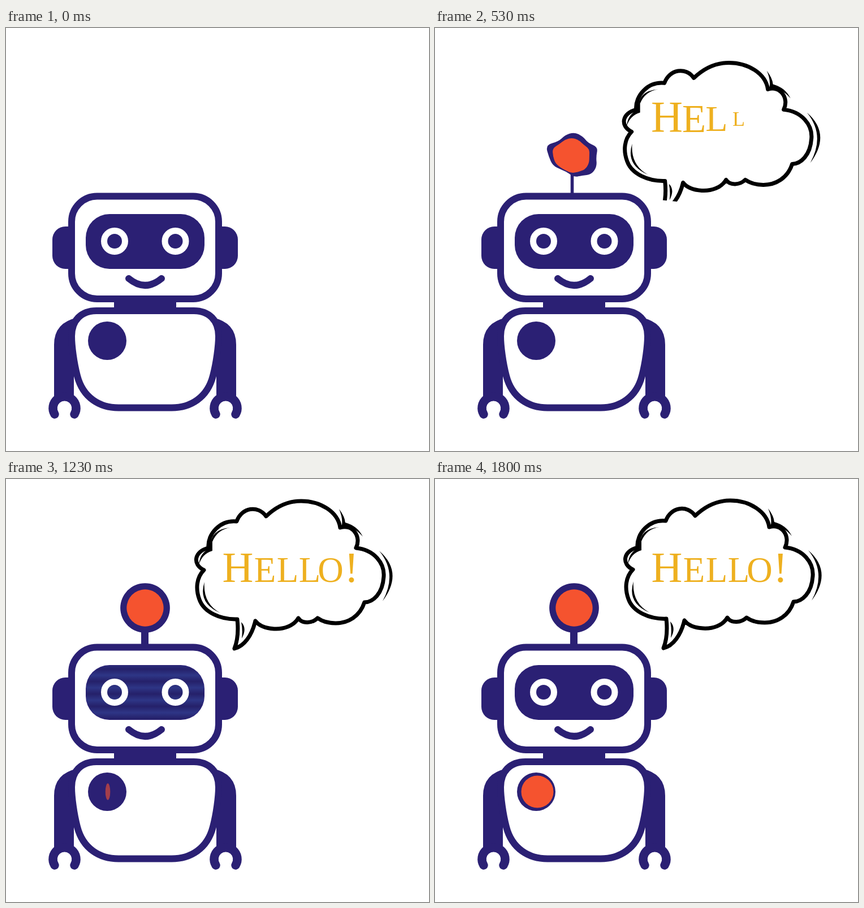
Write an HTML page that moves like this. It is 748 px wide and 748 px high and loops after 5000 ms.

```html
<!DOCTYPE html>
<html lang="en">
<head>
<meta charset="utf-8">
<title>Robot says hello</title>
<style>
  html, body { margin: 0; height: 100%; overflow: hidden; background: #fff; }
  svg { display: block; width: 100vw; height: 100vh; }
  text { font-family: "Liberation Serif", "Times New Roman", serif; text-anchor: middle; fill: #eeb01f; }
  .ink { fill: #2b2074; }
  .line { stroke: #2b2074; stroke-width: 12; fill: #fff; }
  .badge { fill: #f5532f; }
</style>
</head>
<body>
<svg viewBox="0 0 748 748">
  <defs>
    <clipPath id="wipe"><path d="M0 0H748V339L0 264Z"/></clipPath>
    <linearGradient id="bands" gradientUnits="userSpaceOnUse" x1="0" y1="358" x2="0" y2="369" spreadMethod="reflect">
      <stop offset="0" stop-color="#252069"/><stop offset="1" stop-color="#2e3686"/>
    </linearGradient>
    <g id="side">
      <rect class="ink" x="82" y="351" width="60" height="75" rx="23"/>
      <path class="ink" d="M128 512Q85 520 85 560V655H120V610H130Z"/>
      <path d="M86 683A20.5 20.5 0 1 1 121 683" fill="none" stroke="#2b2074" stroke-width="15.5" stroke-linecap="round"/>
    </g>
  </defs>

  <g id="antenna">
    <rect id="stem" class="ink" y="255" height="40"/>
    <path id="rim" class="ink"/>
    <path id="bulb" class="badge"/>
  </g>

  <use href="#side"/>
  <use href="#side" transform="matrix(-1 0 0 1 492 0)"/>
  <path class="line" d="M160 500H332C358 500 376 516 376 545C376 562 372 592 366 615C356 654 326 671.500 293 671.500H199C166 671.500 136 654 126 615C120 592 116 562 116 545C116 516 134 500 160 500Z"/>
  <rect class="line" x="116" y="297.500" width="260" height="181.500" rx="45"/>
  <rect class="ink" x="191" y="475" width="110" height="30"/>
  <rect class="ink" x="141" y="329" width="210" height="97" rx="42"/>
  <g id="screen">
    <rect x="142" y="330" width="208" height="95" rx="41" fill="#312b96"/>
    <rect id="stripes" x="142" y="330" width="208" height="95" rx="41" fill="url(#bands)"/>
  </g>
  <g fill="none" stroke="#fff" stroke-width="11">
    <circle cx="192" cy="377" r="18.500"/>
    <circle cx="299.500" cy="377" r="18.500"/>
  </g>
  <path d="M217 443Q246 467 275 443" fill="none" stroke="#2b2074" stroke-width="12" stroke-linecap="round"/>
  <circle class="ink" cx="179" cy="553" r="34"/>
  <circle id="chest" class="badge" r="28.500"/>

  <g clip-path="url(#wipe)">
    <g id="bubble">
      <path fill="none" stroke="#000" stroke-width="7" stroke-linejoin="round" d="M404 299C410 284 411 265 409 247
        C380 248 350 235 342 212C335 193 337 173 350 160
        C329 150 333 127 358 121C356 96 379 71 408 74
        C417 49 446 45 460 65C480 46 502 38 522 38
        C556 38 587 57 591 85C613 78 629 101 619 121
        C651 124 670 148 668 172C666 202 649 217 634 217
        C626 242 605 254 583 254C568 254 558 250 551 245
        C542 254 524 256 517 245C509 259 491 265 474 264
        C457 263 447 258 441 250C435 276 421 295 404 299Z"/>
      <path d="M351 181Q339 219 379 236Q348 219 351 181Z
        M397 85Q374 88 365 110V126Q347 131 341 151Q343 129 360 122Q361 87 397 85Z
        M589 52Q599 65 600 76Q622 82 631 101Q616 83 594 81Q596 68 589 52Z
        M660 126Q704 164 666 215Q693 166 660 126Z
        M416 252Q427 263 417 281Q419 266 416 252Z"/>
    </g>
  </g>
  <g id="word"></g>
</svg>
<script>
const LOOP = 5000;
const byId = id => document.getElementById(id);
const clamp = x => Math.max(0, Math.min(1, x));
const progress = (t, start, length) => clamp((t - start) / length);
const backOut = p => 1 + 2.7 * (p - 1) ** 3 + 1.7 * (p - 1) ** 2;
const set = (id, attributes) => {
  for (const name in attributes) byId(id).setAttribute(name, attributes[name]);
};

const letterCentres = [410, 458, 498, 537, 574, 611];
const letters = [..."HELLO!"].map((character, i) => {
  const letter = document.createElementNS("http://www.w3.org/2000/svg", "text");
  letter.textContent = character;
  letter.setAttribute("font-size", i % 5 ? 63 : 76);
  letter.setAttribute("y", 22);
  byId("word").append(letter);
  return letter;
});

// Radii around the antenna lamp while it is most distorted, clockwise from the right.
const lumps = [37, 42, 42, 34, 34, 28, 30, 39, 43, 53, 37, 40, 42, 38, 33, 44];

function blob(cx, cy, radius, wobble) {
  const points = lumps.map((lump, i) => {
    const angle = i * Math.PI / 8;
    // Rounds off to a circle: control points sit slightly outside the curve.
    const r = radius * 1.04 + (lump - 43) * wobble;
    return [cx + r * Math.cos(angle), cy + r * Math.sin(angle)];
  });
  const middle = ([a, b], [c, d]) => `${(a + c) / 2} ${(b + d) / 2}`;
  const curves = points.map((p, i) => `Q${p} ${middle(p, points[(i + 1) % 16])}`);
  return `M${middle(points[15], points[0])}${curves.join("")}Z`;
}

function draw(t) {
  const drop = 275 * 2 ** (-t / 150);
  set("bubble", { transform: `translate(${-0.1 * drop} ${drop})`, opacity: t < 20 ? 0 : 1 });

  letters.forEach((letter, i) => {
    const p = progress(t, 272 + 72 * i, 300);
    letter.setAttribute("transform", `translate(${letterCentres[i]} 160) scale(${p ? backOut(p) : 0})`);
  });

  const wobble = clamp((870 - t) / 340 / 1.4) * 1.4;
  const stemWidth = 13 - 7.5 * wobble;
  set("antenna", { opacity: progress(t, 390, 80) });
  set("stem", { x: 245.5 - 3 * wobble - stemWidth / 2, width: stemWidth });
  set("rim", { d: blob(246, 228, 43, wobble) });
  set("bulb", { d: blob(246 - 4 * wobble, 228 - wobble, 32, wobble * 0.4) });

  const grow = progress(t, 910, 290) ** 1.5;
  set("screen", {
    transform: `translate(246 377.5) scale(${grow}) translate(-246 -377.5)`,
    opacity: t > 900 && t < 1590 ? 1 : 0
  });
  set("stripes", { opacity: 1 - 0.92 * progress(t, 1230, 300) });

  const size = progress(t, 920, 610);
  const turn = Math.cos((1 - size) * Math.PI * 5 / 6);
  set("chest", {
    transform: `translate(${179 + 2 * size} 553) scale(${size * turn} ${size})`,
    opacity: Math.sqrt(progress(t, 920, 880))
  });
}

let start;
function tick(now) {
  start ??= now;
  const frame = Math.floor(((now - start) % LOOP + 5) * 0.03);
  draw(Math.min(frame, 54) * 100 / 3);
  requestAnimationFrame(tick);
}
draw(0);
requestAnimationFrame(tick);
</script>
</body>
</html>
```
